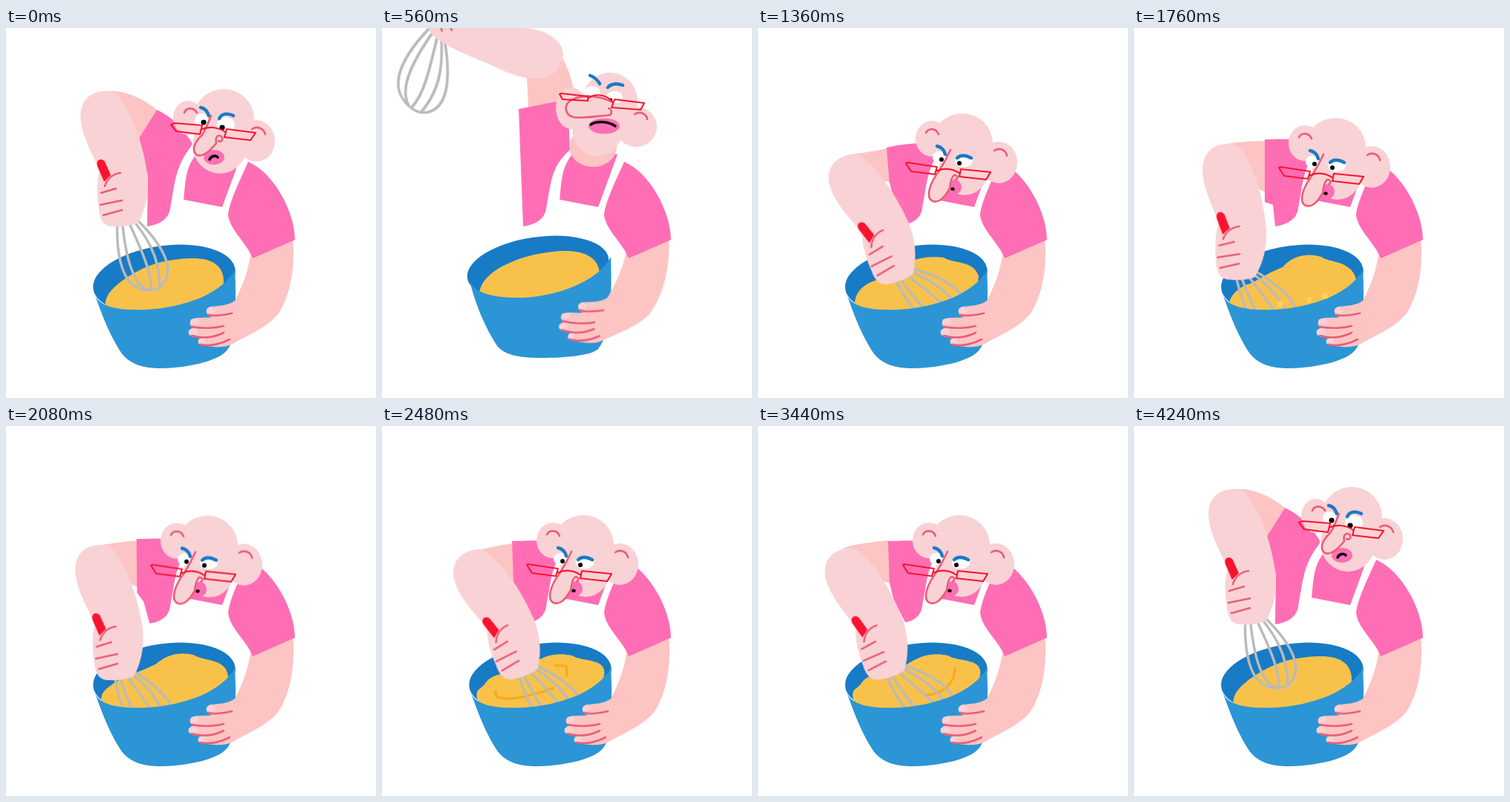
Recreate the animation shown at these times as an HTML page without scripts. Size 498x498 px, loop 4320 ms.

```html
<!DOCTYPE html>
<html lang="en">
<head>
<meta charset="utf-8">
<title>Angry baker</title>
<style>
html,body{margin:0;width:100%;height:100%;overflow:hidden;background:#fff}
svg{display:block;width:100vw;height:100vh}
svg *{animation:4.32s ease-in-out infinite}
.pale{fill:#f9d2d5}
.skin{fill:#fdc4c4}
.pink{fill:#ff6eb4}
.red{fill:#f8142f}
.line{fill:none;stroke:#ea5e78;stroke-width:2.6;stroke-linecap:round;stroke-linejoin:round}
.brow{fill:none;stroke:#187bc6;stroke-width:4.4;stroke-linecap:round}
.specs{fill:none;stroke:#f8142f;stroke-width:2.1;stroke-linejoin:round}
.wire{fill:none;stroke:#bababa;stroke-width:3.4;stroke-linecap:round}
.swirl{fill:none;stroke:#f7ab1c;stroke-width:3.4;stroke-linecap:round;stroke-linejoin:round;opacity:0}
.arm{animation-name:arm;transform-origin:130px 118px}
.whisk{animation-name:whisk;transform-origin:163px 250px}
.hand{animation-name:hand;transform-origin:163px 250px}

/* whisking arm */
@keyframes arm{
  0%,92%,to{transform:translate(0,0) rotate(0)}
  13%{transform:translate(82px,-84px) rotate(116deg)}
  14.8%{transform:translate(80px,-82px) rotate(114deg)}
  22.2%{transform:translate(-8px,70px) rotate(4deg)}
  31.5%{transform:translate(-5px,86px) rotate(-15deg)}
  40.7%{transform:translate(-8px,71px) rotate(3deg)}
  43.5%{transform:translate(-8px,73px) rotate(4deg)}
  57.4%{transform:translate(-4px,82px) rotate(-15deg)}
  69.4%{transform:translate(-9px,73px) rotate(4deg)}
  79.6%{transform:translate(-10px,80px) rotate(-12deg)}
}
@keyframes whisk{
  0%,92%,to{rotate:0deg;transform:scaleX(1)}
  13%{rotate:-75deg;transform:scaleX(1.15)}
  22.2%,40.7%,69.4%{rotate:-17deg;transform:scaleX(1)}
  31.5%,79.6%{rotate:-14deg;transform:scaleX(1)}
  57.4%{rotate:-4deg;transform:scaleX(1)}
}
@keyframes hand{
  0%,22.2%,to{transform:translate(0,0) rotate(0)}
  13%{transform:translate(6px,0) rotate(-30deg)}
}
@keyframes forearm{
  0%,22.2%,to{d:path("M135,85C110,84 97,103 101,127C104,150 118,172 126,192C122,205 122,225 125,243C126,258 132,268 145,267C160,268 172,265 178,262C190,240 193,215 190,195C185,160 172,120 155,97C150,88 143,85 135,85Z")}
  13%{d:path("M132,87C110,84 101,103 102,127C104,150 118,172 126,192C124,205 125,225 130,243C136,262 150,272 160,268C168,268 174,258 174,240C176,225 175,200 173,177C173,150 172,130 166,115C160,95 145,85 132,87Z")}
}
@keyframes upper{
  0%,92%,to{d:path("M130,86C155,80 185,95 203,110L178,150L140,130Z")}
  13%{d:path("M238,30C248,50 256,65 260,95L197,106L194,50Z")}
  31.5%{d:path("M120,171C140,168 155,166 174,162L181,208L140,200Z")}
  22.2%,40.7%,69.4%{d:path("M120,157C140,153 160,152 176,152L176,221L140,200Z")}
  57.4%{d:path("M120,169C140,165 155,161 175,158L180,212L140,200Z")}
  79.6%{d:path("M115,164C135,158 155,156 176,154L179,212L140,200Z")}
}
@keyframes shirt{
  0%,92%,to{d:path("M203,110C220,118 235,130 250,154L250,158C228,186 228,205 221,243C219,258 205,265 190,267L191,200L178,150Z")}
  13%{d:path("M184,109C200,106 225,100 250,97L253,164C228,186 228,205 221,243C219,258 205,265 190,267L187,190L184,109Z")}
  31.5%{d:path("M173,161C185,158 200,156 215,155L250,158C228,186 228,205 221,243C219,258 205,263 202,263L183,232L177,208Z")}
  22.2%,40.7%,69.4%{d:path("M176,150C185,150 200,149 215,150L250,158C228,186 228,205 221,243C219,258 205,265 190,267L187,238L176,234Z")}
  57.4%,79.6%{d:path("M175,155C185,155 200,154 215,154L250,158C228,186 228,205 221,243C219,258 205,264 198,264L183,235L177,211Z")}
}

/* bowl and holding arm */
@keyframes rim{
  0%,24%,to{cx:213px;cy:338px;rx:96.5px;ry:45px}
  13%{cx:212px;cy:323px;rx:96px;ry:42px}
}
@keyframes bowl{
  0%,24%,to{d:path("M119,357C124,375 150,381 190,379C240,376 290,358 308,326C310,360 309,385 306,410C305,420 302,428 298,433C288,447 250,457 210,458C180,458 166,451 155,437C141,415 131,392 119,357Z")}
  13%{d:path("M117,337C121,358 155,364 190,363C235,361 290,342 308,308C309,350 309,375 303,400C302,412 298,422 291,432C282,441 245,444 215,444C180,444 165,439 155,428C138,402 125,370 117,337Z")}
}
@keyframes hold{
  0%,24%,to{transform:rotate(0)}
  13%{transform:rotate(3.7deg)}
}
@keyframes batter{
  0%,95%,to{d:path("M134,378C132,364 138,356 148,347C165,332 185,322 205,316C225,311 240,310 252,310C275,310 292,318 293,340L290,390L140,390Z")}
  13%{d:path("M131,360C130,343 148,326 170,317C180,312 192,308 205,305C220,302 234,300 247,300C275,300 293,311 293,332L290,372L140,372Z")}
  24%{d:path("M133,378C130,362 137,353 148,345C165,335 185,325 205,316C222,309 240,309 252,310C270,314 291,315 295,337L290,390L140,390Z")}
  31.5%{d:path("M130,378C129,360 136,350 150,343C162,338 180,332 203,316C218,307 240,308 250,309C264,318 290,312 297,334L290,390L140,390Z")}
  40.7%{d:path("M128,376C127,362 138,352 150,346C165,342 178,330 200,322C215,305 235,303 252,308C262,316 292,312 299,338L290,390L140,390Z")}
  57.4%,80%{d:path("M131,378C122,350 132,358 140,345C150,330 180,335 205,318C225,306 240,306 256,309C270,318 303,312 299,335L290,390L140,390Z")}
}
@keyframes swirlA{0%,52%{opacity:0}54%,61%{opacity:1}63%,to{opacity:0}}
@keyframes swirlB{0%,74%{opacity:0}76%,82%{opacity:1}84%,to{opacity:0}}
@keyframes specks{0%,37%{opacity:0}39%,43%{opacity:1}45%,to{opacity:0}}

/* head: upright, thrown back, bent over */
@keyframes bob{
  0%,24%,92%,to{transform:translate(0,0)}
  31.5%{transform:translate(4px,-5px)}
  40.7%{transform:translate(0,1px)}
  57.4%,80%{transform:translate(0,0)}
}
@keyframes neck{
  0%,91%,to{cx:288px;cy:163px;rx:30px;ry:25px}
  13%{cx:284px;cy:160px;rx:32px;ry:27px}
  26%,80%{cx:274px;cy:190px;rx:28px;ry:25px}
}
@keyframes skull{
  0%,91%,to{cx:293px;cy:123px;rx:41px;ry:41px}
  13%{cx:307px;cy:98px;rx:37px;ry:38px}
  26%,80%{cx:271px;cy:160px;rx:41px;ry:40px}
}
@keyframes jaw{
  0%,91%,to{cx:288px;cy:157px;rx:37px;ry:39px}
  13%{cx:290px;cy:134px;rx:34px;ry:39px}
  26%,80%{cx:274px;cy:191px;rx:34px;ry:39px}
}
@keyframes earL{
  0%,91%,to{cx:245px;cy:121px;rx:20px;ry:23px}
  13%{cx:255px;cy:108px;rx:21px;ry:28px}
  26%,80%{cx:230px;cy:154px;rx:22px;ry:24px}
}
@keyframes earR{
  0%,91%,to{cx:337px;cy:152px;rx:25px;ry:28px}
  13%{cx:342px;cy:133px;rx:28px;ry:27px}
  26%,80%{cx:320px;cy:186px;rx:25px;ry:28px}
}
@keyframes foldL{
  0%,91%,to{d:path("M240,114C243,106 253,107 257,114");opacity:1}
  13%{d:path("M254,92C257,86 263,86 267,90");opacity:0}
  26%,80%{d:path("M222,146C226,139 236,140 239,148");opacity:1}
}
@keyframes foldR{
  0%,91%,to{d:path("M331,136C339,131 347,136 349,143")}
  13%{d:path("M340,116C348,111 356,116 357,123")}
  26%,80%{d:path("M314,170C322,165 330,170 331,177")}
}
@keyframes eyeL{
  0%,91%,to{cx:263px;cy:124px;rx:9px;ry:9px}
  13%{cx:283px;cy:87px;rx:11px;ry:9px}
  26%,80%{cx:240px;cy:179px;rx:9px;ry:8px}
}
@keyframes eyeR{
  0%,91%,to{cx:296px;cy:130px;rx:12px;ry:10px}
  13%{cx:313px;cy:93px;rx:11px;ry:8px}
  26%,80%{cx:273px;cy:184px;rx:12px;ry:8px}
}
@keyframes pupilL{
  0%,91%,to{cx:266px;cy:127px;rx:3.6px;ry:3.4px}
  13%{cx:278px;cy:92px;rx:1.5px;ry:1.5px}
  26%,80%{cx:243px;cy:182px;rx:3px;ry:3px}
}
@keyframes pupilR{
  0%,91%,to{cx:291px;cy:134px;rx:3.6px;ry:3.4px}
  13%{cx:308px;cy:97px;rx:2.2px;ry:2.4px}
  26%,80%{cx:267px;cy:187px;rx:3px;ry:3px}
}
@keyframes browL{
  0%,91%,to{d:path("M262,107C268,108 271,112 273,118")}
  13%{d:path("M280,64C286,66 290,70 293,75")}
  26%,80%{d:path("M237,164C243,165 247,170 248,175")}
}
@keyframes browR{
  0%,91%,to{d:path("M287,122C290,115 298,114 306,118")}
  13%{d:path("M304,80C308,75 316,74 324,77")}
  26%,80%{d:path("M264,180C268,176 275,176 283,180")}
}
@keyframes nose{
  0%,91%,to{d:path("M276,118C272,128 269,137 264,144C252,155 250,166 257,171C265,174 275,165 283,155C281,146 286,143 290,146C293,150 290,154 286,152")}
  13%{d:path("M309,99C285,88 262,91 252,99C245,105 246,117 258,120C270,122 285,119 298,118C300,118 304,118 307,117C310,114 309,109 305,108")}
  26%,80%{d:path("M255,169C250,180 245,189 240,197C227,214 221,233 231,238C240,241 247,233 254,221C255,212 257,205 260,203C265,203 266,208 262,209")}
}
@keyframes lips{
  0%,91%,to{cx:280px;cy:174px;rx:14px;ry:10px}
  13%{cx:299px;cy:132px;rx:21px;ry:10.5px}
  26%,80%{cx:261px;cy:219px;rx:9px;ry:10px}
}
@keyframes mouth{
  0%,91%,to{d:path("M274,177C276,172 282,171 285,174")}
  13%{d:path("M281,130C288,125 304,125 314,132")}
  26%,80%{d:path("M257,222C257,221 259,221 259,222")}
}
@keyframes lenses{
  0%,91%,to{d:path("M227,128L264,131L261,143L229,139L222,130ZM297,136L336,141L329,151L294,147ZM262,137C272,132 285,133 295,140")}
  13%{d:path("M241,88L277,92L277,98L243,96L239,89ZM313,96L353,101L348,110L309,107ZM277,95C285,88 303,88 311,101")}
  26%,80%{d:path("M197,186L237,192L234,202L202,198L195,187ZM269,195L309,199L303,209L267,205ZM235,198C246,193 258,194 268,201")}
}
</style>
</head>
<body>
<svg viewBox="0 0 498 498">
  <path class="skin" style="animation-name:upper"/>
  <path class="pink" style="animation-name:shirt"/>
  <path class="pink" d="M262,163C240,185 242,208 239,231L291,241L317,170Z"/>

  <ellipse fill="#187bc6" transform="rotate(-8 213 338)" style="animation-name:rim"/>
  <path fill="#f8c24a" style="animation-name:batter"/>
  <path class="swirl" style="animation-name:swirlA" d="M153,357C150,370 175,372 230,353M233,322L248,323L249,336"/>
  <path class="swirl" style="animation-name:swirlB" d="M227,362C250,361 265,345 265,326"/>

  <g class="arm"><g class="whisk wire">
    <path d="M150,256C148,300 154,347 185,352"/>
    <path d="M156,256C160,300 168,342 190,352"/>
    <path d="M162,254C178,290 196,325 195,351"/>
    <path d="M167,254C186,276 207,305 207,348"/>
    <path d="M172,254C200,280 222,310 217,333C213,350 200,355 185,352"/>
  </g></g>

  <path fill="#2b95d6" style="animation-name:bowl"/>
  <g fill="#ffd15f" style="animation-name:specks" opacity="0">
    <ellipse cx="197" cy="372" rx="4" ry="5"/>
    <ellipse cx="236" cy="366" rx="3" ry="4"/>
    <ellipse cx="257" cy="361" rx="4" ry="4"/>
  </g>

  <g style="animation-name:hold;transform-origin:365px 290px">
    <path class="skin" d="M330,300C325,335 315,352 309,366C300,374 285,374 275,375C266,378 269,388 278,389C268,391 255,388 249,393C245,400 250,402 255,403C244,404 242,413 252,416C258,416 262,417 264,417C254,421 258,428 270,428C285,430 295,430 303,426C330,412 355,400 367,384C381,362 390,328 386,280Z"/>
    <g class="pale">
      <ellipse cx="276" cy="380" rx="6" ry="4"/>
      <ellipse cx="254" cy="395" rx="6" ry="4"/>
      <ellipse cx="252" cy="409" rx="6" ry="4"/>
      <ellipse cx="264" cy="421" rx="5" ry="4"/>
    </g>
    <path class="line" d="M272,386C283,389 295,386 304,384M250,402C265,405 282,404 293,401M250,414C265,419 282,416 293,410M262,426C275,429 290,425 301,419"/>
  </g>
  <path class="pink" d="M326,180C360,195 388,245 389,285L332,310C325,290 299,270 299,250C302,230 315,205 326,180Z"/>

  <g style="animation-name:bob">
    <ellipse class="skin" style="animation-name:neck"/>
    <g class="pale">
      <ellipse style="animation-name:earL"/>
      <ellipse style="animation-name:earR"/>
      <ellipse style="animation-name:jaw"/>
      <ellipse style="animation-name:skull"/>
    </g>
    <path class="line" style="animation-name:foldL"/>
    <path class="line" style="animation-name:foldR"/>
    <g fill="#fff">
      <ellipse style="animation-name:eyeL"/>
      <ellipse style="animation-name:eyeR"/>
    </g>
    <ellipse style="animation-name:pupilL"/>
    <ellipse style="animation-name:pupilR"/>
    <path class="brow" style="animation-name:browL"/>
    <path class="brow" style="animation-name:browR"/>
    <ellipse class="pink" style="animation-name:lips"/>
    <path fill="none" stroke="#000" stroke-width="3.4" stroke-linecap="round" style="animation-name:mouth"/>
    <path class="line" style="animation-name:nose;fill:#f9d2d5"/>
    <path class="specs" style="animation-name:lenses"/>
  </g>

  <g class="arm">
    <path class="pale" style="animation-name:forearm"/>
    <g class="hand">
      <path class="red" d="M123,186C120,177 129,174 133,180L141,198L132,207Z"/>
      <path class="line" d="M133,213C136,203 144,196 154,195M128,222L148,216M127,238L156,232M131,252L156,245"/>
    </g>
  </g>
</svg>
</body>
</html>
```
